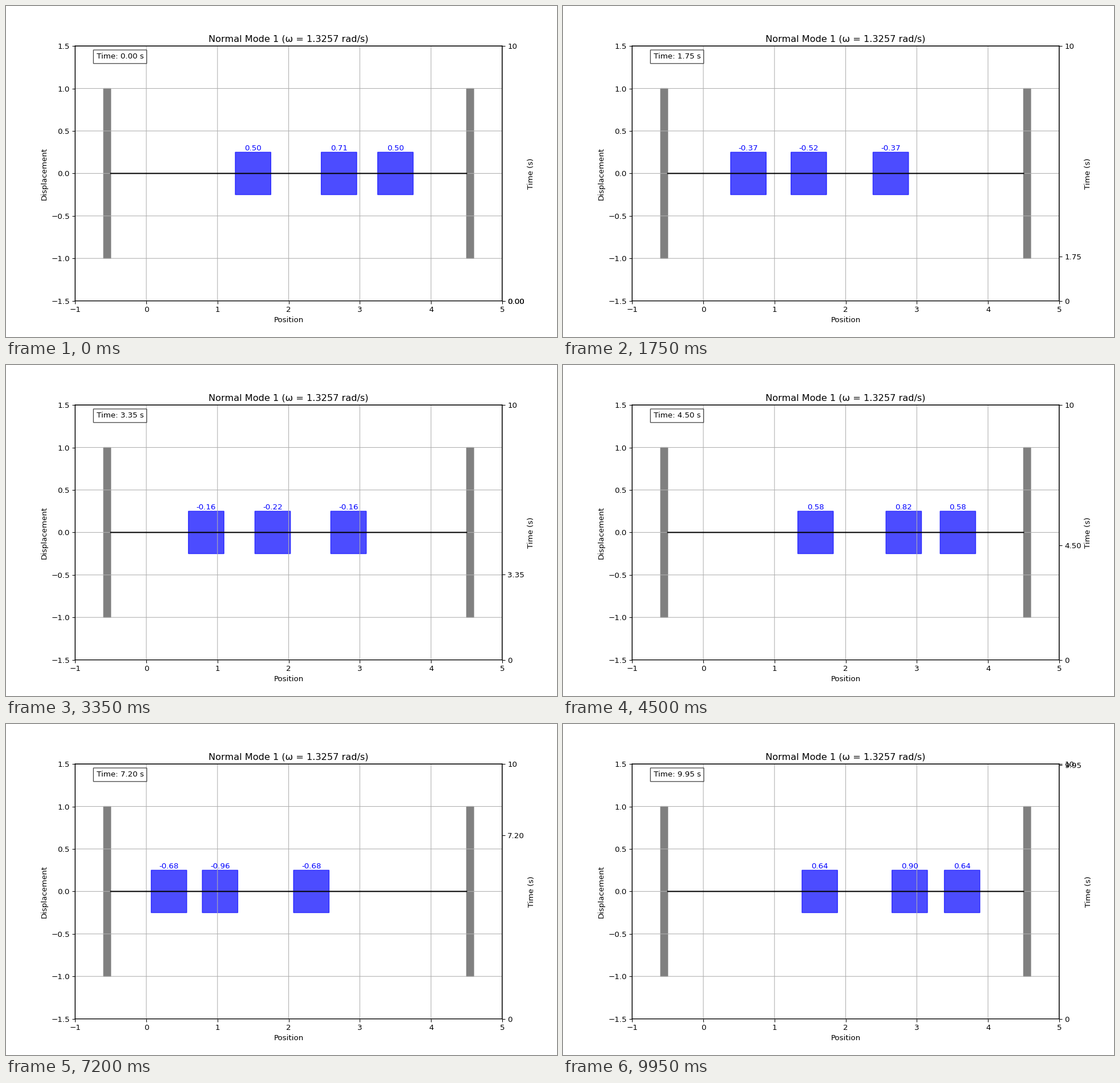
A matplotlib script that plays this animation: 966 by 580 pixels, repeating every 10 s.

```python
import numpy as np
import matplotlib.pyplot as plt
from matplotlib.animation import FuncAnimation
from matplotlib.patches import Rectangle

STIFFNESS, MASS = 3.0, 1.0
DT = 0.05
DURATION = 10
STEPS = int(DURATION / DT)
SIZE = 0.5

omega = np.sqrt((2 - np.sqrt(2)) * STIFFNESS / MASS)
shape = np.array([0.5, np.sqrt(0.5), 0.5])
rest = np.array([1, 2, 3])

# Unsnapped lines keep soft edges at fractional pixel positions.
plt.rcParams.update({"font.family": "DejaVu Sans", "path.snap": False})
fig, ax = plt.subplots(figsize=(10, 6.0042), dpi=96.6)
half_x, half_y = 0.5 / 1000, 0.5 / 600
fig.subplots_adjust(left=0.125 + half_x, right=0.9 + half_x,
                    bottom=0.11 - half_y, top=0.88 - half_y)
ax.set(xlim=(-1, 5), ylim=(-1.5, 1.5), xlabel="Position", ylabel="Displacement",
       title=f"Normal Mode 1 (ω = {omega:.4f} rad/s)")
ax.grid(True)

time_ax = ax.twinx()
time_ax.set_ylim(0, DURATION)
time_ax.set_ylabel("Time (s)")

for x in (-0.6, 4.5):
    ax.add_patch(Rectangle((x, -1), 0.1, 2, color="gray"))
ax.plot([-0.5, 4.5], [0, 0], "k-", lw=1.5)

blocks = [ax.add_patch(Rectangle((x - SIZE / 2, -SIZE / 2), SIZE, SIZE,
                                 color="blue", alpha=0.7)) for x in rest]
labels = [ax.text(x, SIZE / 2, "", color="blue", ha="center", va="bottom")
          for x in rest]
clock = ax.text(0.05, 0.95, "", transform=ax.transAxes,
                bbox=dict(facecolor="white", alpha=0.7))


def displacement(n):
    """State after n explicit Euler steps, whose amplitude slowly grows."""
    return shape * ((1 - 1j * omega * DT) ** n).real


def update(n):
    t = n * DT
    for block, label, x, d in zip(blocks, labels, rest, displacement(n)):
        block.set_x(x + d - SIZE / 2)
        label.set_x(x + d)
        label.set_text(f"{d:.2f}")
    clock.set_text(f"Time: {t:.2f} s")
    time_ax.set_yticks([0, t, DURATION])
    time_ax.set_yticklabels(["0", f"{t:.2f}", str(DURATION)])
    return [*blocks, *labels, clock]


anim = FuncAnimation(fig, update, frames=STEPS, interval=50, repeat=True,
                     repeat_delay=0, blit=False)
plt.show()
```
